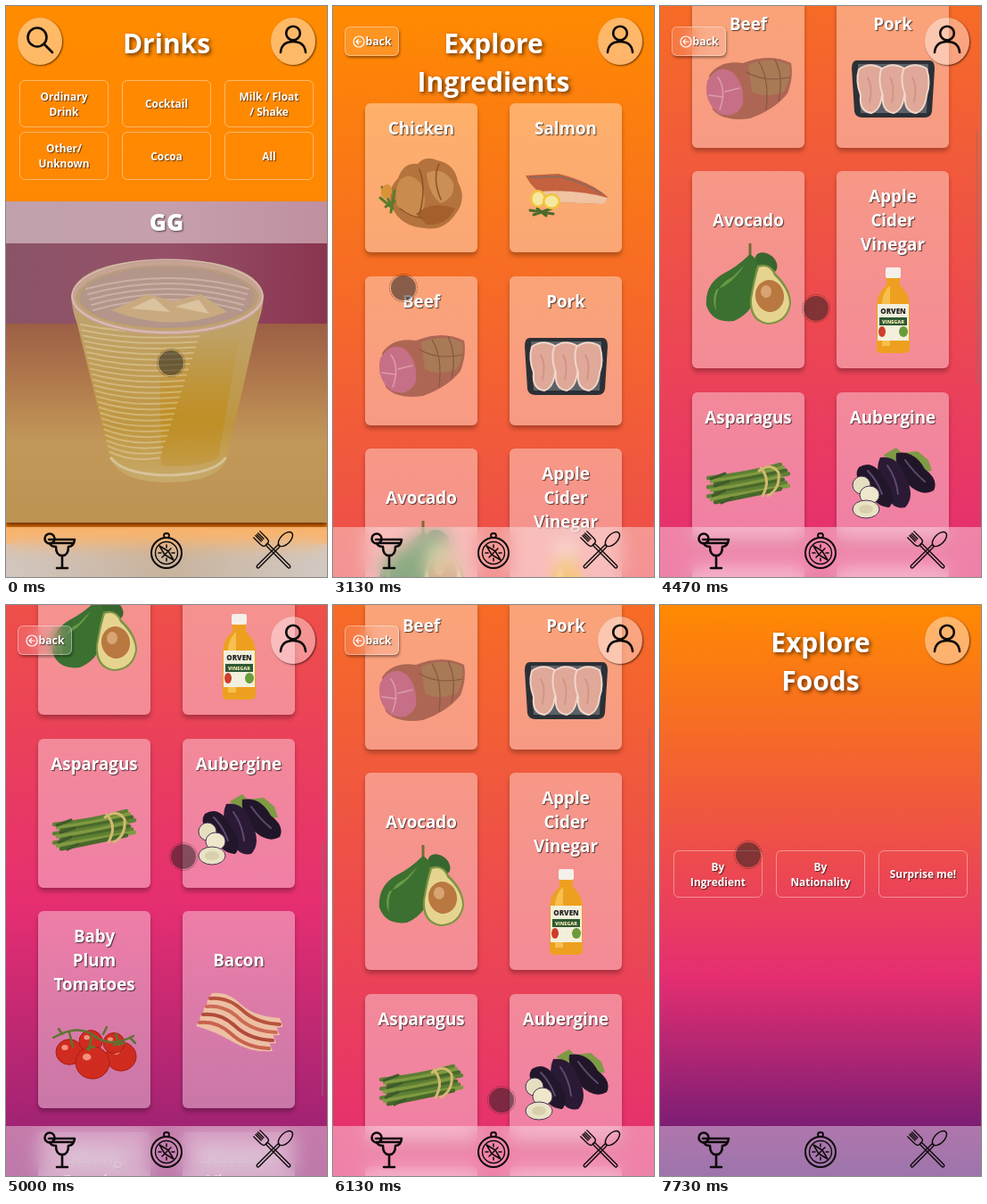
Animation of 360x640 px, one loop 8 s. Source, as an HTML page:

```html
<!DOCTYPE html>
<html lang="en">
<head>
<meta charset="utf-8">
<title>Recipe app</title>
<style>
html, body { margin: 0; width: 100%; height: 100%; overflow: hidden; }
#stage { position: relative; width: 360px; height: 640px; overflow: hidden; color: #fff;
  font-family: "Open Sans", "Noto Sans", sans-serif; text-align: center; }
#stage > *, .page > *, .btn, .round { position: absolute; box-sizing: border-box; }
.page { left: 0; top: 0; width: 360px; height: 640px;
  background: linear-gradient(#ff8a00, #e52e71 65%, #5a1876); }
#drinks { background: linear-gradient(#ff8b00, #fd8206); }
#list { height: 1435px; }
h1 { margin: 0; top: 20px; width: 360px; font: 700 30px/43px "Open Sans", "Noto Sans", sans-serif;
  text-shadow: 2px 2px 4px rgba(0,0,0,.6); }
.btn { width: 100px; height: 53px; border: 1px solid rgba(255,255,255,.4); border-radius: 6px;
  display: flex; align-items: center; justify-content: center;
  font-weight: 700; font-size: 11.9px; line-height: 17px; text-shadow: 1px 1px 1px rgba(0,0,0,.6); }
.round { top: 13px; width: 50px; height: 53px; border-radius: 50%; background: rgba(255,255,255,.4);
  box-shadow: 1px 1px 2px rgba(0,0,0,.6); }
.round svg { position: absolute; left: 0; top: 0; }
.grid { left: 36px; top: 109px; width: 288px; display: grid; gap: 26.5px 36px; grid-template-columns: 126px 126px; }
.card { display: flex; flex-direction: column; align-items: center; justify-content: center; padding: 16px 0;
  border-radius: 6px; background: rgba(255,255,255,.38); box-shadow: 0 4px 5px rgba(0,0,0,.27); }
.card h2 { position: relative; top: -1px; margin: 0 0 11px; font-weight: 700; font-size: 18.8px; line-height: 27px;
  text-shadow: 1px 1px 1px rgba(0,0,0,.65); }
.card svg { display: block; }
#photo { top: 219px; left: 0; box-shadow: 0 4px 5px rgba(80,30,0,.8); }
#band { top: 219px; width: 360px; height: 47px; background: rgba(255,255,255,.45);
  font-weight: 800; font-size: 26px; line-height: 47px; text-shadow: 1px 1px 2px rgba(0,0,0,.6); }
#next { top: 603px; width: 360px; height: 37px; background: linear-gradient(90deg, #b5a196, #a4805c, #b3a59a); }
#back { left: 13px; top: 23px; width: 61px; height: 33px; background: rgba(255,255,255,.12); backdrop-filter: blur(8px);
  font-size: 12.2px; gap: 1px; box-shadow: 1px 2px 3px rgba(0,0,0,.4); }
#bar { left: 354px; top: 0; width: 2px; height: 285px; background: rgba(130,115,115,.45); }
#nav { left: 0; top: 584px; width: 360px; height: 56px; background: rgba(255,255,255,.4); backdrop-filter: blur(10px); }
#status { left: 0; top: 619px; width: 118px; height: 21px; border-radius: 0 4px 0 0; background: #0c0c0c;
  font-size: 11.4px; line-height: 21px; text-align: left; padding-left: 5px; white-space: nowrap; }
#touch { left: -16px; top: -16px; width: 32px; height: 32px; border-radius: 50%; border: 1px dotted rgba(40,30,30,.6); }
#touch::after { content: ""; position: absolute; inset: 1px; border-radius: 50%; background: rgba(30,30,30,.52); }
</style>
</head>
<body>
<div id="stage"></div>
<script>
const shape = (d, fill, line = 'none', w = 1) =>
  `<path d="${d}" fill="${fill}" stroke="${line}" stroke-width="${w}" stroke-linecap="round" stroke-linejoin="round"/>`;
const line = (d, color, w) => shape(d, 'none', color, w);
const oval = (x, y, rx, ry, fill, turn = 0, edge = 'none', w = 1) =>
  `<ellipse cx="${x}" cy="${y}" rx="${rx}" ry="${ry}" fill="${fill}" stroke="${edge}" stroke-width="${w}" transform="rotate(${turn} ${x} ${y})"/>`;
const svg = (w, h, body, attr = '') => `<svg ${attr} width="${w}" height="${h}" viewBox="0 0 ${w} ${h}">${body}</svg>`;
const each = (n, f) => Array.from({ length: n }, (_, i) => f(i)).join('');
const btn = (x, y, text, h = 53) => `<div class="btn" style="left:${x}px;top:${y}px;height:${h}px"><span>${text}</span></div>`;

const art = {
  chicken:
    shape('M15 62Q8 44 22 30Q28 12 44 14Q52 4 66 10Q86 14 89 34Q99 52 88 68Q74 90 52 86Q24 84 15 62Z', '#b4733c') +
    shape('M24 32Q34 22 46 34Q58 54 46 74Q28 74 20 58Q18 42 24 32Z', '#c98b4e') +
    shape('M54 24Q74 16 84 36Q86 52 70 58Q56 48 54 24Z', '#ca8f55') +
    shape('M42 70Q60 54 86 64Q76 84 54 82Z', '#a4602c') +
    line('M46 20Q54 42 46 70M68 14Q60 30 70 54M24 64Q36 74 48 74', '#8a5228', 1.5) +
    line('M4 40L16 64M2 52L14 62M18 44L14 68M8 62L18 56', '#5c7a2c', 3) + oval(9, 45, 6, 8, '#d8923a', 15),
  salmon:
    shape('M3 27L40 25Q76 34 95 51Q95 57 88 59L38 57Q12 46 3 27Z', '#c4613f') +
    shape('M18 45Q58 42 95 52Q94 58 88 59L38 57Z', '#f0c3a2') +
    line('M8 29L40 28Q70 35 88 47', '#8f6a5a', 2) +
    line('M8 66L34 70M12 71L32 64M16 64L26 72', '#4c6a2c', 3) +
    oval(17, 53, 9, 10, '#f0c53c') + oval(17, 53, 6.5, 7.5, '#f7e8a0') +
    oval(32, 56, 10, 9, '#f0c53c') + oval(32, 56, 7.5, 6.5, '#f7e8a0'),
  beef:
    shape('M4 32Q16 14 42 18Q72 6 96 18Q99 34 92 52Q78 70 50 80Q20 84 8 70Z', '#ad6654') +
    shape('M48 20Q74 10 94 20Q97 34 88 50Q66 58 52 50Z', '#a97a56') +
    shape('M2 38Q14 18 30 28Q44 40 42 64Q34 82 14 74Q-3 60 2 38Z', '#c76f86') +
    line('M14 34Q24 48 16 70M22 50L38 46M4 54L20 56', '#dc9cab', 1.5) +
    line('M60 17Q72 36 68 70M78 14Q88 34 82 60M46 28Q66 40 94 34', '#85583f', 1.2),
  pork:
    shape('M8 15H89Q95 15 95 24L92 72Q91 79 84 79H14Q6 79 5 72L2 24Q2 15 8 15Z', '#2c3036') +
    shape('M9 19H88L86 74H12Z', '#5c6167') +
    each(3, i => `<g transform="translate(${i * 25} 0)">` +
      shape('M10 25Q22 16 36 24Q41 40 36 54Q34 71 24 74Q10 72 12 54Q6 38 10 25Z', '#dfa898', '#f0d6ca', 2) +
      line('M20 34Q26 44 22 62', '#cf9080', 1.5) + '</g>'),
  avocado:
    oval(68, 22, 14, 10, '#38662f', 40) + line('M50 1V14', '#7a6a34', 3) +
    shape('M50 12Q63 20 60 42Q58 76 32 87Q8 90 1 70Q-1 46 20 34Q36 26 50 12Z', '#3b7030') +
    shape('M44 24Q30 46 12 52Q6 64 12 76Q8 48 30 38Z', '#699a45') +
    shape('M58 25Q72 20 79 34Q96 50 96 68Q92 90 70 91Q48 88 50 62Q54 38 58 25Z', '#7d9443') +
    shape('M60 27Q72 23 77 36Q94 52 94 68Q90 88 70 89Q51 86 52 62Q56 39 60 27Z', '#e5d490') +
    oval(72, 59, 16, 18, '#b9783f', -10) + oval(68, 54, 6, 7, '#d9a474'),
  vinegar:
    shape('M41 10H56V20Q66 28 67 42V92Q66 96 61 96H36Q30 96 30 92V42Q31 28 41 20Z', '#eda01f') +
    shape('M36 38Q38 26 45 20V88H36Z', '#f7bf4e') +
    `<rect x="40" y="0" width="17" height="12" rx="2" fill="#f3f0ea"/>` +
    shape('M31 41H66V82H31Z', '#f2efdc') + shape('M33 56H64V65H33Z', '#2e5a34') +
    oval(36, 72, 4, 6, '#cf3d2c') + oval(60, 72, 5, 6, '#6c9b3c') +
    '<g font-family="Open Sans, sans-serif" font-weight="800" text-anchor="middle">' +
    '<text x="48.5" y="52" font-size="8" fill="#222">ORVEN</text>' +
    '<text x="48.5" y="63" font-size="5.5" fill="#f2e6b0">VINEGAR</text></g>',
  asparagus:
    each(9, i => line(`M${3 + i % 3 * 4} ${42 + i * 3.4}Q46 ${38 + i * 3} ${84 + i % 4 * 3} ${27 + i * 3.4}`,
      ['#5f7f34', '#7f9a40', '#48682a'][i % 3], 4.5)) +
    line('M6 43L22 37M10 51L26 46M8 62L22 56M18 70L30 64', '#3f5a2a', 3) +
    line('M62 31Q74 44 64 62M60 34Q74 24 82 36Q84 54 70 62', '#d3b970', 3),
  aubergine:
    shape('M38 16L52 8L58 14L76 12L88 22L92 34L70 36L48 28Z', '#7f9a45') +
    shape('M52 14Q72 10 84 32Q100 44 94 56Q80 64 64 48Q50 34 52 14Z', '#211629') +
    shape('M34 19Q54 16 62 40Q74 62 62 75Q46 78 40 58Q26 36 34 19Z', '#2a1a35') +
    shape('M10 30Q26 20 38 42Q54 64 44 75Q28 74 20 56Q2 42 10 30Z', '#22162b') +
    line('M42 28Q52 42 54 60M62 22Q72 36 84 46M20 34Q30 44 36 60', '#5c4b6c', 2) +
    oval(13, 50, 10, 10, '#e6dfbf', 0, '#4a3556') + oval(22, 61, 11, 10, '#eee7cb', 0, '#4a3556') +
    oval(18, 77, 15, 10, '#e9e2c4', 0, '#4a3556') + oval(18, 77, 8, 5, '#d8d0ac'),
  tomatoes:
    [[20, 50, 15], [44, 38, 13], [78, 55, 17], [70, 40, 12], [46, 62, 19]].map(([x, y, r]) =>
      oval(x, y, r, r * .95, '#cf2c1f', 0, '#a81d15') + oval(x - r / 3, y - r / 3, r / 4, r / 5, '#f4907c')).join('') +
    line('M2 34Q30 18 48 32T92 32M20 28L24 44M45 33L42 48M72 30L76 42M12 30L8 24M58 30L62 22M88 34L94 40M40 46L48 44M70 42L82 40', '#5d7431', 2.5),
  bacon:
    each(4, i => `<g transform="translate(${-i * 4 + 8} ${i * 9 - 3})">` +
      shape('M10 14Q28 12 42 26T86 42L90 52Q66 54 46 42T4 24Z', '#edbfa4') +
      line('M8 20Q28 18 44 33T86 49', ['#b8533c', '#cc6c55', '#b14a3a', '#c8634d'][i], 4) + '</g>'),
  powder: oval(48, 72, 44, 14, '#e4e2de') + shape('M8 70Q30 58 46 28Q66 56 90 70Q50 88 8 70Z', '#fbfaf7'),
  balsamic:
    shape('M42 12H55V26Q67 34 67 46V92Q66 96 62 96H35Q30 96 30 92V46Q30 34 42 26Z', '#2c1a18') +
    shape('M40 0H57V14H40Z', '#a88b42') + shape('M30 52H67V80H30Z', '#e8dfc2')
};

const foods = [['Chicken', 'chicken'], ['Salmon', 'salmon'], ['Beef', 'beef'], ['Pork', 'pork'],
  ['Avocado', 'avocado'], ['Apple<br>Cider<br>Vinegar', 'vinegar'], ['Asparagus', 'asparagus'],
  ['Aubergine', 'aubergine'], ['Baby<br>Plum<br>Tomatoes', 'tomatoes'], ['Bacon', 'bacon'],
  ['Baking<br>Powder', 'powder'], ['Balsamic<br>Vinegar', 'balsamic']];
const cards = foods.map(([name, pic]) => `<div class="card"><h2>${name}</h2>${svg(97, 97, art[pic])}</div>`).join('');

const grad = (id, dir, ...stops) => `<linearGradient id="${id}" ${dir}>` +
  stops.map(([o, c]) => `<stop offset="${o}" stop-color="${c}"/>`).join('') + '</linearGradient>';
const down = 'x1="0" y1="0" x2="0" y2="1"';
const photo = svg(360, 360,
  grad('wall', '', [0, '#8a5468'], [.5, '#965068'], [1, '#8a3550']) +
  grad('table', down, [0, '#9c5f45'], [.3, '#b17a4c'], [.6, '#c2985a'], [1, '#bd9352']) +
  grad('drink', down, [0, '#b59a84'], [.3, '#bfa268'], [.75, '#bf963f'], [1, '#c7aa6c']) +
  grad('amber', down, [0, 'rgba(192,138,30,0)'], [.6, 'rgba(192,138,20,.6)'], [1, 'rgba(192,138,20,.3)']) +
  shape('M0 0H360V138H0Z', 'url(#wall)') + shape('M0 137H360V360H0Z', 'url(#table)') +
  shape('M73 106Q80 66 181 65Q282 66 289 106Q288 122 282 138L247 290Q238 314 181 315Q126 314 117 288L80 138Q74 122 73 106Z', 'url(#drink)') +
  shape('M172 160L262 150L238 288Q212 300 174 296Z', 'url(#amber)') +
  each(24, i => line(`M${84 + i * 1.4} ${138 + i * 6.2}Q140 ${150 + i * 6.2} ${218 - i * 2} ${145 + i * 6.2}`, 'rgba(238,222,190,.4)', 2)) +
  oval(181, 108, 98, 34, '#b3958a') +
  each(5, i => line(`M${90 + i * 2} ${98 + i * 6}Q181 ${74 + i * 6} ${272 - i * 2} ${98 + i * 6}`, 'rgba(235,215,210,.4)', 2)) +
  shape('M118 122L160 104L188 112L218 104L248 124Q182 148 118 122Z', '#c9aa80') +
  shape('M140 120L166 108L184 124ZM190 118L216 110L228 126Z', 'rgba(245,232,205,.4)') +
  oval(181, 108, 105, 39, 'none', 0, '#c7a394', 5) + oval(181, 106, 107, 41, 'none', 0, 'rgba(245,225,215,.5)', 1.5) +
  line('M118 288Q132 306 181 307Q232 306 246 288', '#d8c29a', 3), 'id="photo"');

const ink = '#0d0a0a';
const nav = svg(360, 56, `<g fill="none" stroke="${ink}">` +
  line('M48 14H77Q76 22 70 22Q70 32 63 32Q56 32 56 22Q50 22 49 18M51 18H75M63 32V46M57 46H69', ink, 2.6) +
  oval(49, 13, 5.5, 5.5, 'none', 0, ink, 2.6) +
  oval(180, 29, 17, 17, 'none', 0, ink, 2) + oval(180, 29, 12.5, 12.5, 'none', 0, ink, 1.4) +
  oval(180, 9.5, 3, 2.5, 'none', 0, ink, 1.8) +
  line('M172 21L182 27L188 37L178 31ZM185 24L175 34M180 20V23M180 35V38M171 29H174M186 29H189', ink, 1.5) +
  '<g transform="rotate(45 300 27)" stroke-width="1.4"><rect x="298.5" y="18" width="3" height="35" rx="1.5"/><ellipse cx="300" cy="8" rx="5.5" ry="10"/></g>' +
  '<g transform="rotate(-45 300 27)" stroke-width="1.4"><rect x="298.5" y="16" width="3" height="37" rx="1.5"/>' +
  '<path d="M295 0V11Q295 16 298 16H302Q305 16 305 11V0M298 0V10M300 0V10M302 0V10"/></g></g>');

const search = svg(51, 54, oval(22, 22, 10.5, 10.5, 'none', 0, ink, 2.6) + line('M30 30L39 39', ink, 2.6));
const person = svg(51, 54, oval(25, 17.5, 7.8, 7.8, 'none', 0, ink, 2.6) + line('M11 39Q12 27 25 27Q38 27 39 39', ink, 2.6));
const arrow = svg(14, 14, oval(7, 7, 6, 6, 'none', 0, '#fff', 1.2) + line('M10 7H4M6.5 4.5L4 7L6.5 9.5', '#fff', 1.2));
const cols = [15, 130, 245];
const filters = ['Ordinary<br>Drink', 'Cocktail', 'Milk / Float<br>/ Shake', 'Other/<br>Unknown', 'Cocoa', 'All'];

const stage = document.getElementById('stage');
stage.innerHTML = `
<div class="page" id="drinks"><h1>Drinks</h1>
  <div class="round" style="left:13px">${search}</div>
  ${filters.map((s, i) => btn(cols[i % 3], i < 3 ? 83 : 141, s, i < 3 ? 53 : 54)).join('')}
  ${photo}<div id="band">GG</div><div id="next"></div></div>
<div class="page" id="explore"><h1>Explore</h1>${btn(53, 275, 'Explore<br>Foods')}${btn(207, 275, 'Explore<br>Drinks')}</div>
<div class="page" id="foods"><h1>Explore<br>Foods</h1>
  ${['By<br>Ingredient', 'By<br>Nationality', 'Surprise me!'].map((s, i) => btn(cols[i], 275, s)).join('')}</div>
<div class="page" id="list"><h1>Explore<br>Ingredients</h1><div class="grid">${cards}</div></div>
<div class="btn" id="back">${arrow}<span>back</span></div>
<div class="round" style="left:297px">${person}</div>
<div id="bar"></div><div id="nav">${nav}</div>
<div id="status">Aguardando www....</div><div id="touch"></div>`;

// Rows are [ms, values...]
const pages = [[0, 'drinks'], [1060, 'explore'], [2060, 'foods'], [3130, 'list'], [6795, 'foods']];
const scroll = [[3930, 0], [4200, 206], [4330, 268], [4467, 311], [4730, 365], [4800, 395], [5000, 594], [5090, 676],
  [5267, 795], [5590, 795], [6000, 455], [6133, 308], [6270, 185], [6400, 90], [6530, 25], [6660, 0]];
const finger = [[140, 185, 400], [400, 144, 470], [660, 168, 585], [866, 194, 632], [1340, 194, 632], [1600, 165, 470],
  [1930, 138, 316], [2270, 138, 316], [2430, 185, 361], [2660, 79, 316], [3470, 79, 316], [3870, 178, 560],
  [4200, 175, 339], [4467, 175, 339], [4730, 205, 526], [5000, 199, 282], [5090, 197, 200], [5540, 197, 200],
  [6000, 189, 555], [6400, 189, 555], [6730, 45, 52], [7010, 45, 52], [7200, 170, 190], [7400, 311, 305],
  [7570, 210, 312], [7730, 99, 280]];

function at(rows, t) {
  const i = rows.findIndex(r => r[0] > t);
  if (i === 0) return rows[0].slice(1);
  if (i < 0) return rows[rows.length - 1].slice(1);
  const a = rows[i - 1], b = rows[i], k = (t - a[0]) / (b[0] - a[0]);
  return a.slice(1).map((v, j) => v + (b[j + 1] - v) * k);
}

const $ = id => document.getElementById(id);
const show = (id, on) => { $(id).style.display = on ? '' : 'none'; };

function draw(now) {
  const t = Math.floor((now % 8000) * .015 + .1) / .015;
  const page = pages.filter(p => p[0] <= t).pop()[1];
  for (const id of ['drinks', 'explore', 'foods', 'list']) show(id, id === page);
  const [y] = at(scroll, t), [fx, fy] = at(finger, t);
  $('list').style.transform = `translateY(${-Math.round(y)}px)`;
  $('bar').style.transform = `translateY(${y * 640 / 1435}px)`;
  $('touch').style.transform = `translate(${fx}px, ${fy}px)`;
  show('back', page === 'list');
  show('bar', page === 'list' && t > 3930 && t < 6790);
  show('status', (t > 1060 && t < 1395) || (t > 6795 && t < 7195));
}

function loop() {
  draw(performance.now());
  requestAnimationFrame(loop);
}
loop();
</script>
</body>
</html>
```
